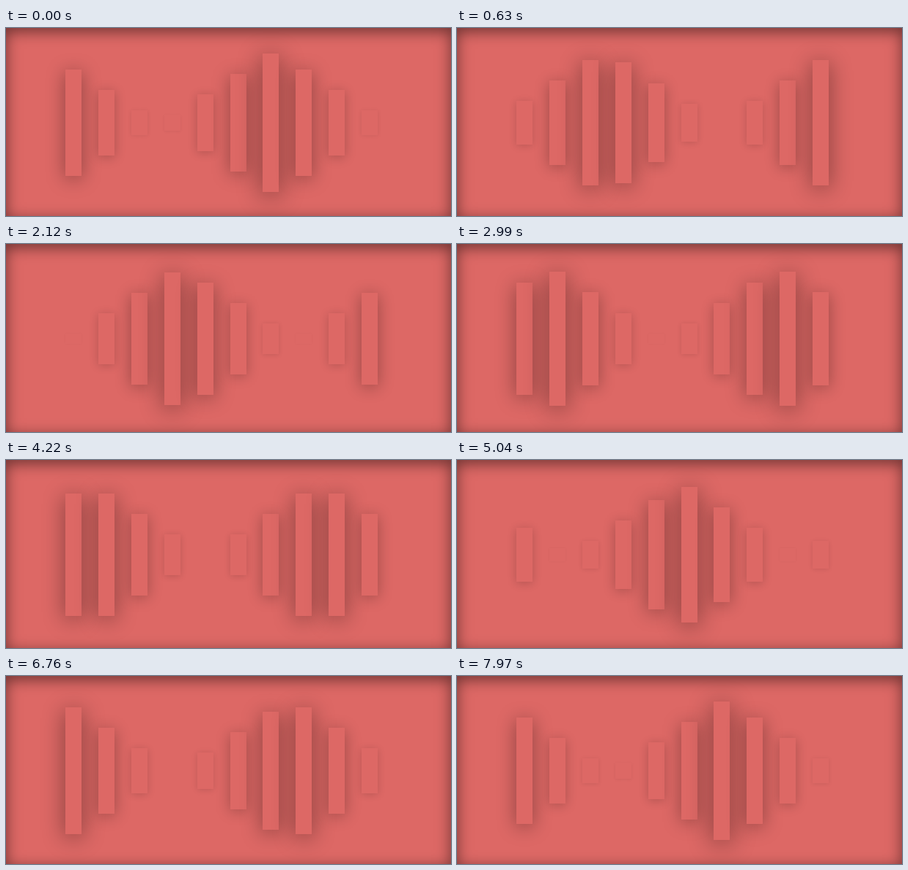
Recreate the animation shown at these times as an HTML page. Size 607 px wide and 258 px high, loop 8000 ms.

```html
<!DOCTYPE html>
<html lang="en">
<head>
<meta charset="utf-8">
<title>Wave bars</title>
<style>
  html, body { margin: 0; width: 100%; height: 100%; overflow: hidden; background: #dd6865; }
  #stage {
    position: relative; width: 607px; height: 258px; overflow: hidden;
    background: #dd6865; box-shadow: inset 0 5px 20px rgba(0, 0, 0, .5);
  }
  .bar { position: absolute; width: 22px; background: #dd6865; }
</style>
</head>
<body>
<div id="stage"></div>
<script>
const LOOP = 8000, COUNT = 10, WAVE = 7, FULL = 196.5, MID = 130;
const LEFT = 81, PITCH = 44.9, START = 6.1;

// [ms, wave cycles]: a nearly steady drift
const PACE = [[0, 0], [1370, 1.036], [2990, 2.237], [4220, 3.2], [5870, 4.442], [6760, 5.071], [7970, 6]];

const stage = document.getElementById('stage');
const bars = Array.from({ length: COUNT }, (_, i) => {
  const bar = document.createElement('div');
  bar.className = 'bar';
  bar.style.left = Math.round(LEFT + i * PITCH) + 'px';
  return stage.appendChild(bar);
});

function cycles(t) {
  const k = PACE.findIndex(p => p[0] > t);
  if (k < 0) return PACE[PACE.length - 1][1];
  const [t0, c0] = PACE[k - 1], [t1, c1] = PACE[k];
  return c0 + (c1 - c0) * (t - t0) / (t1 - t0);
}

function draw(t) {
  const crest = START + WAVE * cycles(t);
  bars.forEach((bar, i) => {
    const d = (((i - crest) % WAVE) + WAVE) % WAVE;
    const s = 1 - Math.min(d, WAVE - d) / (WAVE / 2);
    const h = FULL * s;
    bar.style.top = MID - h / 2 + 'px';
    bar.style.height = h + 'px';
    bar.style.boxShadow = `0 ${5 * s}px ${35 * s}px rgba(0, 0, 0, ${0.5 * s})`;
  });
}

const origin = performance.now();
function tick() {
  draw((performance.now() - origin) % LOOP);
  requestAnimationFrame(tick);
}
tick();
</script>
</body>
</html>
```
